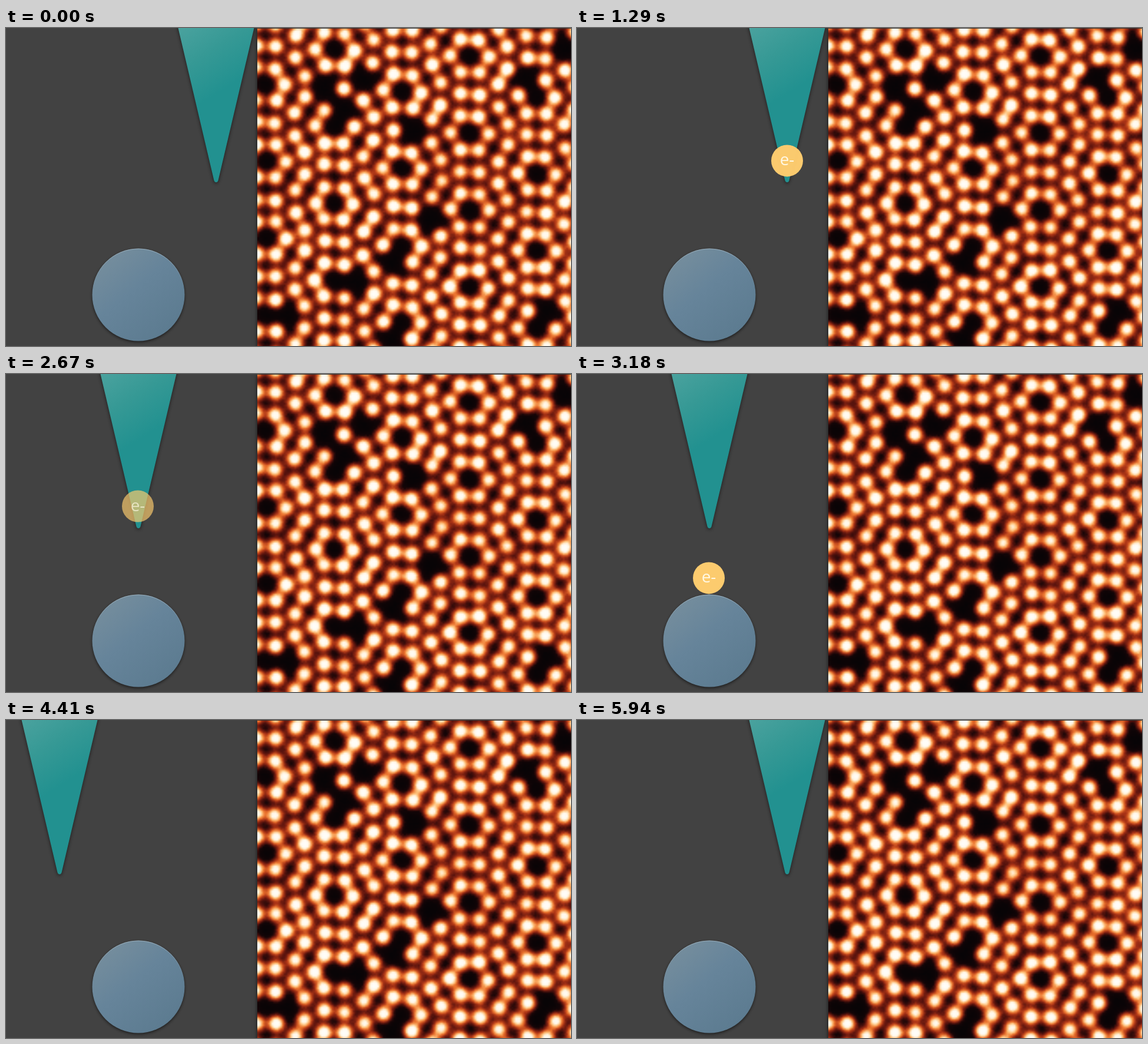
Write an HTML page with a canvas that moves like this. It is 960 by 540 pixels and loops after 5.97 s.

```html
<!DOCTYPE html>
<html lang="en">
<head>
<meta charset="utf-8">
<title>Tunnelling microscope</title>
<style>
html, body { margin: 0; width: 100%; height: 100%; overflow: hidden; background: #424242; }
canvas { display: block; width: 960px; height: 540px; }
</style>
</head>
<body>
<canvas id="stage" width="960" height="540"></canvas>
<script>
const ctx = document.getElementById('stage').getContext('2d');
const LOOP = 5970, SCAN_X = 427, CELL = 3;

const clamp = v => Math.max(0, Math.min(1, v));
const ramp = (t, a, b) => clamp((t - a) / (b - a));
const smooth = u => u * u * (3 - 2 * u);
const ease = (t, a, b) => smooth(ramp(t, a, b));
const hash = (x, y) => {
  const v = Math.sin(x * 12.9898 + y * 78.233) * 43758.5453;
  return v - Math.floor(v);
};

// Reconstructed 7x7 surface: corner holes on a slightly drifting lattice
const corner = (i, j) => [558 + 116 * j - 0.5 * j * j, 35.5 + 71.6 * j - 0.4 * j * j + 130.8 * i];

const vacancies = [
  [607, 84], [574, 139], [541, 100], [690, 172], [886, 87], [951, 33],
  [723, 322], [657, 395], [591, 430], [656, 527], [474, 488], [919, 480]
];

// Six adatoms in one half cell
function halfCell(v, out) {
  const mid = k => (v[0][k] + v[1][k] + v[2][k]) / 7;
  for (let a = 0; a < 3; a++) {
    for (let b = a; b < 3; b++) {
      const x = mid(0) + (v[a][0] + v[b][0]) * 2 / 7;
      const y = mid(1) + (v[a][1] + v[b][1]) * 2 / 7;
      if (vacancies.some(p => Math.hypot(p[0] - x, p[1] - y) < 12)) continue;
      const dim = 0.14 * Math.exp(-((x - 790) ** 2 + (y - 250) ** 2) / 9000);
      out.push({ x: x + hash(x, y) * 3 - 1.5, y: y + hash(y, x) * 3 - 1.5,
                 h: 1.06 + 0.22 * hash(x + 3, y) - dim });
    }
  }
}

function adatoms() {
  const out = [];
  for (let j = -3; j < 5; j++) {
    for (let i = -5; i < 8; i++) {
      const o = corner(i, j), a = corner(i + 1, j);
      halfCell([o, a, corner(i, j + 1)], out);
      halfCell([o, a, corner(i + 1, j - 1)], out);
    }
  }
  return out;
}

const heat = [
  [0, 7, 4, 6], [0.22, 20, 5, 7], [0.38, 92, 20, 14], [0.54, 172, 52, 22],
  [0.7, 236, 116, 46], [0.86, 255, 196, 124], [1.02, 255, 246, 228], [1.2, 255, 253, 248]
];

function heatColour(h) {
  let k = 1;
  while (k < heat.length - 1 && h > heat[k][0]) k++;
  const p = heat[k - 1], q = heat[k], u = ramp(h, p[0], q[0]);
  return [1, 2, 3].map(c => p[c] + (q[c] - p[c]) * u);
}

function makeScan() {
  const w = 178, h = 180, field = new Float32Array(w * h);
  for (const s of adatoms()) {
    const cx = (s.x - SCAN_X) / CELL, cy = s.y / CELL;
    for (let y = Math.max(0, Math.ceil(cy - 12)); y < Math.min(h, cy + 12); y++) {
      for (let x = Math.max(0, Math.ceil(cx - 12)); x < Math.min(w, cx + 12); x++) {
        const d = ((x + 0.5 - cx) ** 2 + (y + 0.5 - cy) ** 2) * CELL * CELL;
        field[y * w + x] += s.h * Math.exp(-d / 215);
      }
    }
  }
  const c = document.createElement('canvas');
  c.width = w;
  c.height = h;
  const g = c.getContext('2d'), img = g.createImageData(w, h);
  field.forEach((v, n) => {
    const grain = (hash(n % w, Math.floor(n / w)) - 0.5) * 0.05;
    img.data.set([...heatColour(v + grain), 255], n * 4);
  });
  g.putImageData(img, 0, 0);
  return c;
}

const scan = makeScan();

function gradient(x0, y0, x1, y1, ...stops) {
  const g = ctx.createLinearGradient(x0, y0, x1, y1);
  stops.forEach(([at, colour]) => g.addColorStop(at, colour));
  return g;
}

function shadow(blur, dy, alpha) {
  ctx.shadowColor = `rgba(0,0,0,${alpha})`;
  ctx.shadowBlur = blur;
  ctx.shadowOffsetY = dy;
}

function disc(x, y, r) {
  ctx.beginPath();
  ctx.arc(x, y, r, 0, Math.PI * 2);
}

function drawAtom() {
  ctx.save();
  shadow(5, 2, 0.55);
  ctx.fillStyle = gradient(165, 385, 275, 520, [0, '#768e9d'], [0.45, '#66849a'], [1, '#5c7b90']);
  disc(225, 453, 78.5);
  ctx.fill();
  ctx.restore();
  ctx.strokeStyle = gradient(0, 375, 0, 440, [0, 'rgba(170,190,202,.7)'], [1, 'rgba(170,190,202,0)']);
  ctx.lineWidth = 1;
  disc(225, 453, 78);
  ctx.stroke();
}

function drawTip(x) {
  ctx.save();
  ctx.translate(x, 0);
  shadow(6, 2, 0.55);
  ctx.fillStyle = gradient(-60, -10, 12, 105, [0, '#4ca39f'], [0.5, '#369995'], [1, '#229190']);
  ctx.beginPath();
  ctx.moveTo(-69.2, -20);
  ctx.lineTo(69.2, -20);
  ctx.lineTo(3.5, 259);
  ctx.quadraticCurveTo(2.5, 262, 0, 262);
  ctx.quadraticCurveTo(-2.5, 262, -3.5, 259);
  ctx.fill();
  ctx.restore();
}

function drawElectron(x, y, alpha) {
  if (alpha <= 0) return;
  ctx.save();
  ctx.globalAlpha = alpha;
  ctx.fillStyle = '#fccb6e';
  disc(x, y, 27);
  ctx.fill();
  ctx.fillStyle = '#fff8e4';
  ctx.font = '28px "Open Sans", "Noto Sans", sans-serif';
  ctx.textAlign = 'center';
  ctx.fillText('e-', x, y + 8);
  ctx.restore();
}

const tipX = t => 357 - 132 * ease(t, 1400, 1900) - 134 * ease(t, 3740, 4190) + 266 * ease(t, 5500, 5930);

const fade = (t, a, b, c, d) => Math.min(ramp(t, a, b), 1 - ramp(t, c, d));

function drawElectrons(t) {
  drawElectron(357, 495 - 270 * ease(t, 900, 1300), fade(t, 725, 890, 1290, 1420));
  const dip = ease(t, 2750, 3150) - ease(t, 3150, 3550);
  drawElectron(224, 224.5 + 124 * dip, fade(t, 2560, 2725, 3560, 3727));
  drawElectron(86, 495 - 270 * ease(t, 4970, 5490), fade(t, 4780, 4960, 5480, 5640));
}

function drawScan() {
  ctx.save();
  shadow(7, 1, 0.7);
  ctx.fillStyle = '#1a0808';
  ctx.fillRect(SCAN_X, 1, 540, 545);
  ctx.restore();
  ctx.imageSmoothingEnabled = true;
  ctx.drawImage(scan, SCAN_X, 1, 534, 540);
}

function draw(t) {
  ctx.fillStyle = '#424242';
  ctx.fillRect(0, 0, 960, 540);
  drawAtom();
  drawTip(tipX(t));
  drawElectrons(t);
  drawScan();
}

const start = performance.now();
function tick() {
  draw((performance.now() - start) % LOOP);
  requestAnimationFrame(tick);
}
tick();
</script>
</body>
</html>
```
